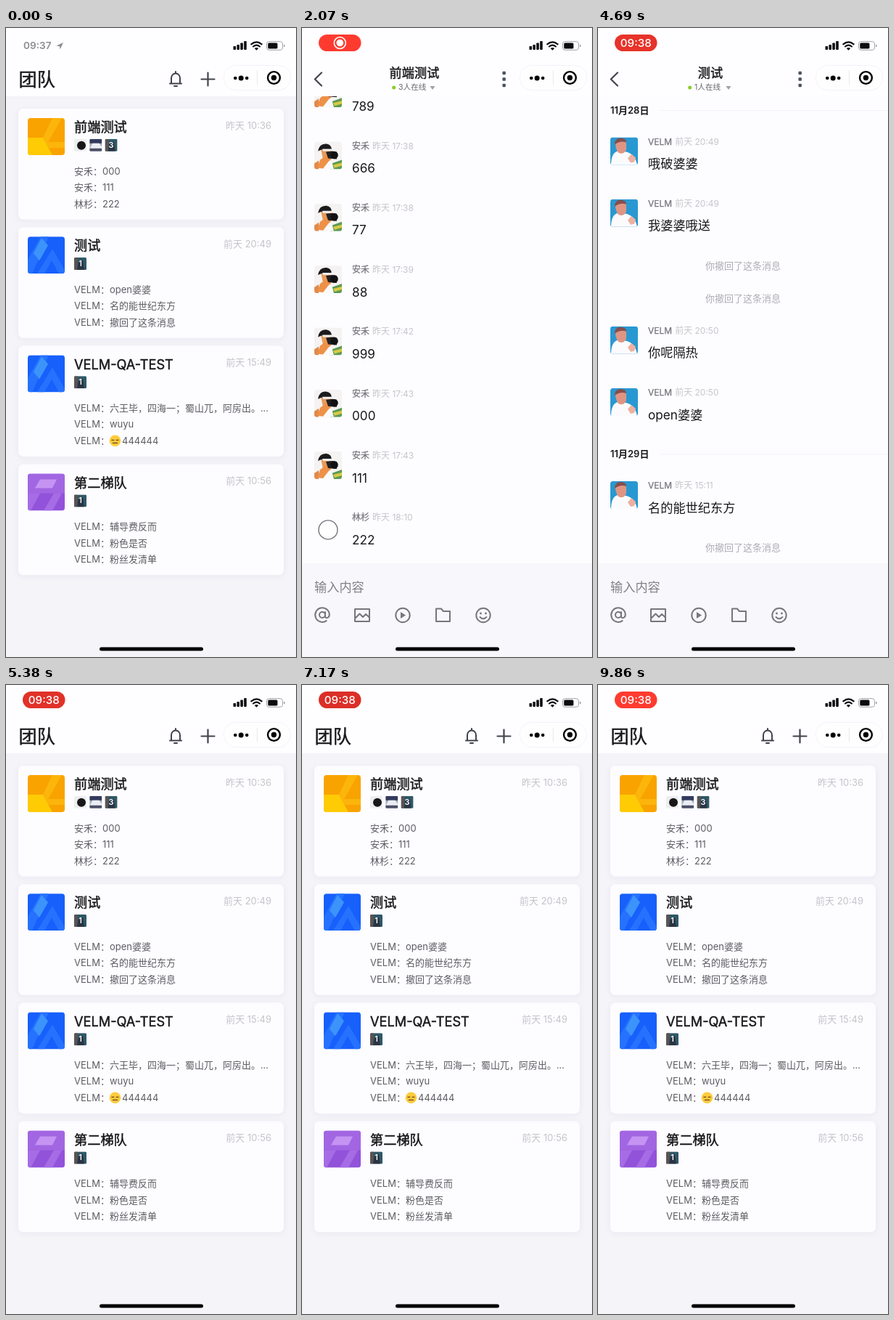
Animation, 400 px wide and 866 px high, one loop 9.89 s. Source, as an HTML page:

```html
<!DOCTYPE html>
<html lang="zh-CN">
<head>
<meta charset="utf-8">
<title>团队</title>
<style>
  html, body { margin: 0; width: 100%; height: 100%; overflow: hidden; background: #f5f4f9; }
  svg { display: block; width: 400px; height: 866px; }
  text { font-family: Inter, "Noto Sans CJK SC", "Noto Sans CJK", sans-serif; white-space: pre; }
  .line { fill: none; stroke-linecap: round; stroke-linejoin: round; }
  .medium { stroke: #18181b; stroke-width: .45px; }
  .name { fill: #77767b; stroke: #77767b; stroke-width: .25px; }
</style>
</head>
<body>
<svg id="stage" viewBox="0 0 400 866" xmlns="http://www.w3.org/2000/svg"></svg>
<script>
const LOOP = 9890, SLIDE = 450, OFF = 410;
const ME = 'VELM', PAL = '安禾', MATE = '林杉';
const YESTERDAY = '昨天 ', BEFORE = '前天 ';

// ---------- drawing helpers ----------
const text = (x, y, size, str, fill, more = '') =>
  `<text x="${x}" y="${y}" font-size="${size}" fill="${fill}" ${more}>${str}</text>`;
const rect = (x, y, w, h, fill, r = 0, more = '') =>
  `<rect x="${x}" y="${y}" width="${w}" height="${h}" rx="${r}" fill="${fill}" ${more}/>`;
const circle = (x, y, r, fill, more = '') =>
  `<circle cx="${x}" cy="${y}" r="${r}" fill="${fill}" ${more}/>`;
const shape = (d, fill) => `<path d="${d}" fill="${fill}"/>`;
const line = (d, color, width) => `<path class="line" d="${d}" stroke="${color}" stroke-width="${width}"/>`;
const at = (x, y, body, more = '') => `<g transform="translate(${x} ${y})" ${more}>${body}</g>`;
const MID = 'text-anchor="middle"', END = 'text-anchor="end"', MEDIUM = 'class="medium"';
const INK = '#18181b';

const emoji = (x, y, r) => at(x, y,
  circle(0, 0, r, '#fdcb3c') +
  line(`M${-r * .6} ${-r * .12}h${r * .4}M${r * .2} ${-r * .12}h${r * .4}M${-r * .4} ${r * .4}h${r * .8}`, '#70451c', r * .15));

// ---------- team icons and avatars ----------
const icons = {
  orange: rect(0, 0, 51, 51, '#f9a300') +
    shape('M34 0H47L28 33L21 27Z', '#fcb50b') +
    shape('M0 27H21L34 51H0Z', '#ffcb05') +
    shape('M21 27L28 33H51V41H29Z', '#fcb50b'),
  blue: rect(0, 0, 51, 51, '#1760fb') +
    shape('M0 32L18 0H29L6 51H0ZM34 17L51 46V51H43L33 33L23 51H13Z', '#2672ff') +
    shape('M19 2L28 12L16 33L8 23Z', '#3c94fb'),
  purple: rect(0, 0, 51, 51, '#9253da') +
    shape('M0 0H51V27H0Z', '#a266e2') +
    shape('M36 27H47L34 51H22ZM0 27H17L4 51H0Z', '#a66ce5') +
    shape('M17 8H40L34 20H10Z', '#c594f3')
};

const faces = {
  camera: rect(0, 0, 38, 38, '#f5f3f2') +
    shape('M24 30L38 25V38H22Z', '#5d9a55') + shape('M26 32L38 29V33L28 36Z', '#d8cb43') +
    shape('M0 30L6 26V38H0Z', '#e08a4a') +
    shape('M9 38L12 29L24 27L27 38Z', '#fafafa') +
    shape('M9 10Q18 6 24 12V23Q20 30 12 24Z', '#e99a58') +
    shape('M5 13Q7 2 17 3Q24 4 24 12L10 11Z', '#1b1a1d') + shape('M11 10L24 10L25 13L12 13Z', '#f1efee') +
    shape('M4 36L8 25L19 17L23 23L12 37Z', '#ee9148') +
    shape('M16 14L25 13L31 14V24L19 23Z', '#202024') + circle(27.5, 18.5, 5.3, '#111114'),
  round: rect(0, 0, 38, 38, '#fdfcff') +
    circle(19, 22.5, 13, '#fff', 'stroke="#77757a" stroke-width="1.4"'),
  me: rect(0, 0, 38, 38, '#2998d2') +
    shape('M1 38Q1 22 10 19L22 20Q34 23 37 38Z', '#fbfbfe') +
    shape('M7 8Q14 1 22 7L22 17Q18 25 11 21Q7 16 7 8Z', '#e09583') +
    shape('M6 10Q6 1 14 1Q22 1 22 7Q14 4 6 10Z', '#85504e') +
    shape('M24 29L29 23L35 28L33 34L28 35Z', '#eeb09f')
};

const mini = {
  ink: rect(0, 0, 17, 17, '#eeeef0') + circle(10, 9, 6, '#17171a'),
  car: rect(0, 0, 17, 17, '#a3aaba') + rect(0, 0, 17, 6, '#343a5c') +
    shape('M1 12L4 6H13L17 11V13H1Z', '#eceef4') + rect(0, 13, 17, 4, '#4b5066'),
  dusk: rect(0, 0, 17, 17, '#2f5867') + shape('M0 0H5L4 17H0Z', '#5b5353') +
    shape('M4 17L6 5L12 4L14 17Z', '#2a3443')
};
const badge = n => mini.dusk + text(8.5, 12, 11, n, '#fff', `${MID} font-weight="600"`);

// ---------- list page ----------
const card = (i, { title, time, icon, minis, rows }) => at(0, 163.2 * i,
  rect(17, 111, 366, 152.5, '#fdfcff', 7, 'filter="url(#soft)"') +
  at(30, 124, icons[icon], 'clip-path="url(#iconClip)"') +
  text(94, 143.3, 18.2, title, INK, MEDIUM) +
  text(366, 138.5, 13, time, '#c5c4c9', END) +
  minis.map((m, k) => at(94 + 21.3 * k, 152.8, m, 'clip-path="url(#miniClip)"')).join('') +
  rows.map((r, k) => text(94, 201.7 + 22.4 * k, 13, r, '#5d5c61')).join(''));

const cards = [
  { title: '前端测试', time: YESTERDAY + '10:36', icon: 'orange', minis: [mini.ink, mini.car, badge(3)],
    rows: [PAL + '：000', PAL + '：111', MATE + '：222'] },
  { title: '测试', time: BEFORE + '20:49', icon: 'blue', minis: [badge(1)],
    rows: ['open婆婆', '名的能世纪东方', '撤回了这条消息'].map(s => `${ME}：${s}`) },
  { title: ME + '-QA-TEST', time: BEFORE + '15:49', icon: 'blue', minis: [badge(1)],
    rows: [`${ME}：六王毕，四海一；蜀山兀，阿房出。...`, ME + '：wuyu', ME + '：<tspan x="160">444444</tspan>'] },
  { title: '第二梯队', time: BEFORE + '10:56', icon: 'purple', minis: [badge(1)],
    rows: ['辅导费反而', '粉色是否', '粉丝发清单'].map(s => `${ME}：${s}`) }
];

const listPage = rect(0, 0, 400, 866, '#f5f4f9') + rect(0, 0, 400, 94, '#fefdff') +
  text(17.5, 79.5, 25.2, '团队', INK, MEDIUM) +
  line('M226 76.5H242M228 76V69a6 6.6 0 0 1 12 0V76M234 60V62M232 80H236', '#40444c', 2) +
  line('M269.5 70.5H287.5M278.5 61.5V79.5', '#40444c', 2.2) +
  cards.map((c, i) => card(i, c)).join('') + emoji(150.5, 568.3, 7.8);

// ---------- chat pages ----------
const message = (y, face, name, time, body) =>
  at(17, y, faces[face], 'clip-path="url(#faceClip)"') +
  text(69, y + 10, 12, `<tspan class="name">${name}</tspan><tspan dx="4">${time}</tspan>`, '#c6c5ca') +
  text(69, y + 42.5, 17.2, body, INK);
const mine = (y, time, body) => message(y, 'me', ME, BEFORE + time, body);
const quoted = (y, body) => mine(y, '20:52', '') +
  rect(69, y + 22, 304, 34, '#f5f4f8', 3) + rect(69, y + 22, 4, 34, '#dedde3', 1.5) +
  text(83, y + 43.7, 13, ME + ': 哦你好', '#222226') + text(69, y + 83.2, 17.2, body, INK);
const recalled = y => text(200, y, 13, '你撤回了这条消息', '#aeadb3', MID);
const day = (y, str) => text(17, y + 4.5, 13, str, INK, 'font-weight="600"') + rect(86, y, 314, 1, '#f4f3f7');

const pal = [['789', '17:38'], ['666', '17:38'], ['77', '17:38'], ['88', '17:39'], ['999', '17:42'], ['000', '17:43'], ['111', '17:43']];
const chats = [
  { title: '前端测试', online: 3, start: 1300, end: 2400, blank: true,
    body: pal.map(([s, t], i) => message(71.2 + 85.3 * i, 'camera', PAL, YESTERDAY + t, s)).join('') +
      message(668.4, 'round', MATE, YESTERDAY + '18:10', '222') },
  { title: '测试', online: 1, start: 3637, end: 4800,
    body: day(113, '11月28日') + mine(150.5, '20:49', '哦破婆婆') + mine(235.7, '20:49', '我婆婆哦送') +
      recalled(331.7) + recalled(376.5) + mine(410.7, '20:50', '你呢隔热') + mine(496, '20:50', 'open婆婆') +
      day(586.5, '11月29日') + message(624, 'me', ME, YESTERDAY + '15:11', '名的能世纪东方') + recalled(720) },
  { title: ME + '-QA-TEST', online: 1, start: 5560, end: 6480,
    body: ['hhh', '哦你好', '哦你的', 'hhh', '六王毕，四海一；蜀山兀，阿房出。', 'wuyu', '<tspan x="91">444444</tspan>']
      .map((s, i) => mine(156.6 + 85.3 * i, '15:49', s)).join('') + emoji(79, 704.5, 9.5) },
  { title: '第二梯队', online: 1, start: 8250, end: 9350, blank: true,
    body: text(69, 117.5, 17.2, `@${ME} 哦你的`, INK) + mine(161.5, '11:08', 'hhh') +
      ['反馈答复是快递费', '辅导费反而', '粉色是否', '粉丝发清单'].map((s, i) => quoted(247 + 126.8 * i, s)).join('') }
];

const GREY = '#77767c';
const ring = x => circle(x, 808.5, 9.7, 'none', `stroke="${GREY}" stroke-width="2"`);
const tools =
  circle(28, 808, 4, 'none', `stroke="${GREY}" stroke-width="2"`) +
  line('M32 804V809.5q0 3 2.8 2.6 3-.8 3-4.6a9.8 9.8 0 1 0-4.2 8.6', GREY, 2) +
  line('M73 800H93V817H73ZM74 812L79.5 806.5L84 811L88 807L93 811.5', GREY, 2) +
  ring(139) + shape('M136 804V813L143 808.5Z', GREY) +
  line('M185 799.5H192L195 803H204V817H185Z', GREY, 2) +
  ring(250) + circle(246.5, 806, 1.4, GREY) + circle(253.5, 806, 1.4, GREY) + line('M245.5 811q4.5 4.4 9 0', GREY, 1.8);

const chatPage = c => `<g class="page">` +
  rect(-8, 0, 8, 866, 'url(#edge)') + rect(0, 0, 400, 866, '#fdfcff') +
  `<g class="content">${c.body}${rect(0, 0, 400, 94, '#fefdff')}` +
  text(155, 68.3, 17.2, c.title, INK, `${MID} ${MEDIUM}`) + circle(126.7, 82, 2.5, '#86cf24') +
  text(133, 85.3, 10.6, c.online + '人在线', '#68676d') + '</g>' +
  rect(0, 737, 400, 129, '#f8f7fb') + text(17, 775.5, 17.2, '输入内容', '#838288') +
  `<g class="late">${line('M27 61.5L17.8 70.5L27 79.5', '#40444c', 2.2)}` + shape('M176.5 80H183.5L180 85Z', '#a09fa5') +
  [62, 70.5, 79].map(y => rect(276.5, y - 2.2, 4.4, 4.4, '#4a525e', 1)).join('') + tools + '</g></g>';

// ---------- fixed chrome ----------
const chrome =
  [5, 7, 9.5, 12].map((h, i) => rect(313.5 + 4.9 * i, 30 - h, 3.6, h, '#0c0c0e', 1)).join('') +
  line('M338.3 22.4q7.2-6.2 14.4 0M341 25.5q4.5-3.6 9 0', '#0c0c0e', 2.1) + shape('M342.8 28q2.7-2 5.4 0L345.5 30.8Z', '#0c0c0e') +
  rect(359.5, 18.7, 22, 11.6, 'none', 3.2, 'stroke="#a3a2a7"') + rect(361.3, 20.5, 13.2, 8, '#0c0c0e', 1.6) +
  shape('M383 22.5q1.8 .6 1.8 2t-1.8 2Z', '#a3a2a7') +
  rect(300.5, 51.5, 92, 34, '#fff', 17, 'fill-opacity=".5" stroke="#f3f2f6"') +
  rect(346, 59, 1, 19, '#e8e7eb') +
  circle(316.3, 69, 2.3, '#000') + circle(324.2, 69, 3.5, '#000') + circle(332.2, 69, 2.3, '#000') +
  circle(369.5, 68.5, 8.4, 'none', 'stroke="#000" stroke-width="2.4"') + circle(369.5, 68.5, 3.7, '#000') +
  `<g id="plain">${text(24, 29.3, 13.6, '09:37', '#8d8c91', 'font-weight="600"')}${shape('M69.5 24.6L79 20L74.6 29.4L74 25.2Z', '#8d8c91')}</g>` +
  `<g id="pill">${rect(23, 9, 58.5, 23, '#ff3b30', 11.5, 'id="pillBack"')}` +
  `<g id="rec">${circle(52.3, 20.5, 8, 'none', 'stroke="#fff" stroke-width="1.6"')}${circle(52.3, 20.5, 4.8, '#fff')}</g>` +
  ['09:37', '09:38'].map((s, i) => text(52.3, 26, 15.2, s, '#fff', `${MID} font-weight="500" id="clock${i}"`)).join('') + '</g>' +
  rect(129, 852.5, 143, 5, '#000', 2.5);

const clip = (id, size, r) => `<clipPath id="${id}">${rect(0, 0, size, size, '#000', r)}</clipPath>`;
const stage = document.getElementById('stage');
stage.innerHTML = '<defs>' + clip('iconClip', 51, 4) + clip('miniClip', 17, 1.5) + clip('faceClip', 38, 3.5) +
  '<filter id="soft" x="-5%" y="-10%" width="110%" height="125%"><feDropShadow dx="0" dy="2" stdDeviation="4" flood-color="#50466e" flood-opacity=".05"/></filter>' +
  '<linearGradient id="edge"><stop stop-color="#000" stop-opacity="0"/><stop offset="1" stop-color="#000" stop-opacity=".05"/></linearGradient></defs>' +
  listPage + rect(0, 0, 400, 866, '#000', 0, 'id="dim" opacity="0"') + chats.map(chatPage).join('') + chrome;

// ---------- motion: stops are [ms, value, easing] ----------
const track = (el, prop, stops) => el.animate(
  stops.map(([t, v, easing = 'linear']) => ({ offset: t / LOOP, [prop]: v, easing })),
  { duration: LOOP, iterations: Infinity });
const show = (el, from, to = LOOP) => track(el, 'opacity',
  [[0, 0, 'step-end'], [from, 1, 'step-end'], ...(to < LOOP ? [[to, 0, 'step-end']] : []), [LOOP, 0]]);
const visit = ({ start, end }, out, inn) =>
  [[start, out, 'ease'], [start + SLIDE, inn], [end, inn, 'ease'], [end + SLIDE, out]];
const $ = id => document.getElementById(id);

const away = `translateX(${OFF}px)`, home = 'translateX(0px)';
document.querySelectorAll('.page').forEach((page, i) => {
  const c = chats[i], settled = c.start + SLIDE + 20;
  track(page, 'transform', [[0, away], ...visit(c, away, home), [LOOP, away]]);
  show(page.querySelector('.late'), settled);
  if (c.blank) show(page.querySelector('.content'), settled);
});
track($('dim'), 'opacity', [[0, 0], ...chats.flatMap(c => visit(c, 0, .1)), [LOOP, 0]]);

track($('plain'), 'opacity', [[0, 1, 'step-end'], [350, 0, 'step-end'], [LOOP, 0]]);
show($('pill'), 350);
show($('rec'), 350, 2900);
show($('clock0'), 2900, 4600);
show($('clock1'), 4600);
const pulse = Array.from({ length: 10 }, (_, i) => [100 + 1000 * i, i % 2 ? '#db2f27' : '#ff3b30', 'ease-in-out']);
track($('pillBack'), 'fill', [[0, '#ff3b30'], ...pulse, [LOOP, '#ff3b30']]);
</script>
</body>
</html>
```
